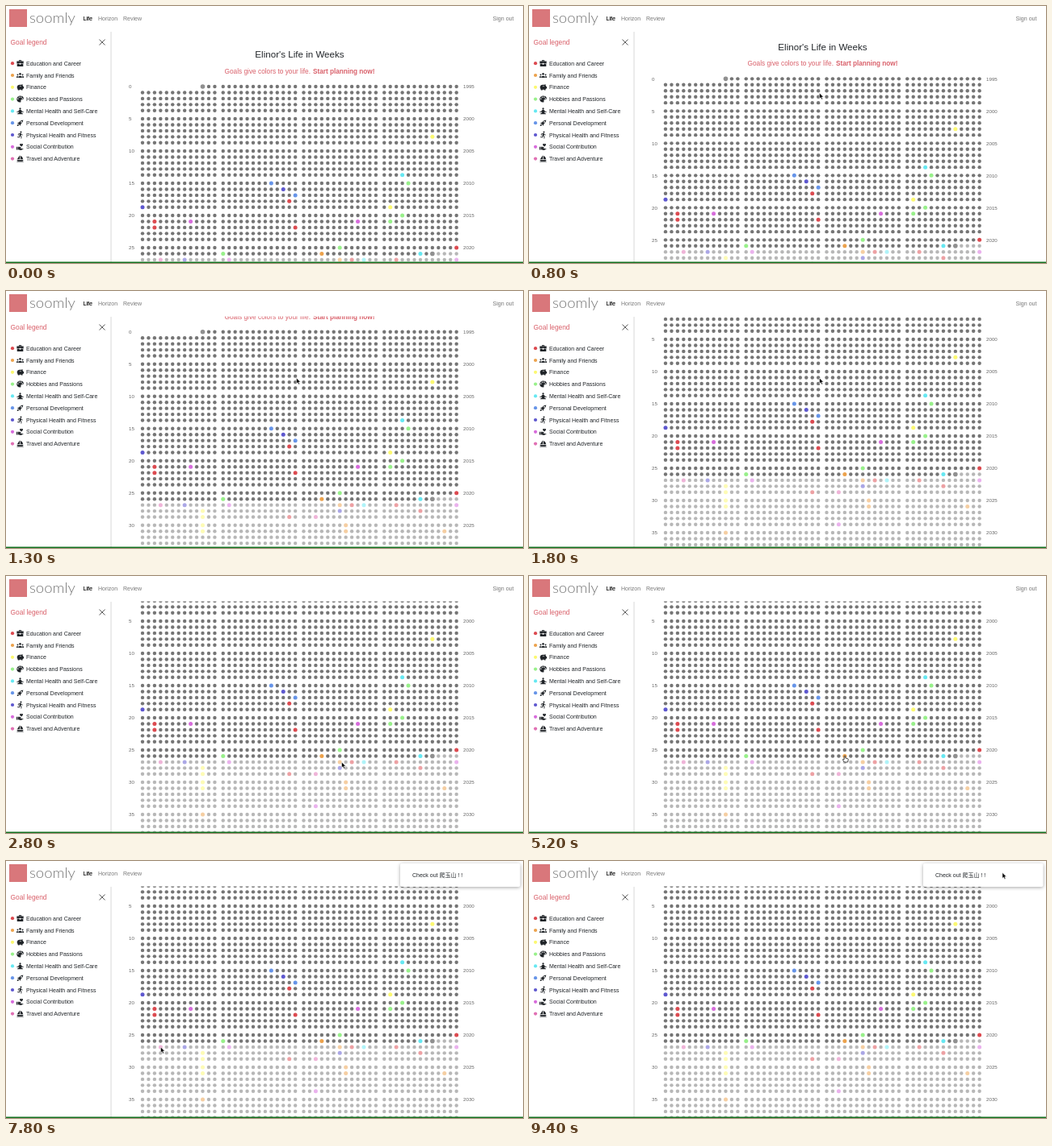
An HTML page for the animation above (9500 ms loop, 640 by 319 pixels).

```html
<!DOCTYPE html>
<html lang="en">
<head>
<meta charset="utf-8">
<title>Life in weeks</title>
<style>
  html, body { margin: 0; width: 100%; height: 100%; overflow: hidden; background: #fff; }
  svg { display: block; width: 100vw; height: 100vh; }
  text { font-family: "Liberation Sans", "Noto Sans CJK TC", "Noto Sans CJK", sans-serif; white-space: pre; }
  #toast rect { filter: drop-shadow(0 1px 2px rgba(0, 0, 0, .35)); }
</style>
</head>
<body>
<svg id="stage" viewBox="0 0 640 319">
  <g id="page"></g>
  <rect width="640" height="31.5" fill="#fff"/>
  <g id="chrome"></g>
  <g id="toast"><rect x="488" y="3" width="148.5" height="29" rx="2" fill="#fff"/></g>
  <g id="cursor" stroke-linejoin="round">
    <path id="arrow" d="M0 0V6.9L1.6 5.5L2.7 8L4 7.4L2.9 5H5Z" fill="#000" stroke="#fff" stroke-width=".5"/>
    <path id="hand" d="M-.8 4.6V.6Q0-.6.8.6V3L3.6 3.7Q4.4 4 4.2 5L3.6 8H-.6L-2.7 5Q-2.6 3.8-.8 4.6Z" fill="#fff" stroke="#000" stroke-width=".7"/>
  </g>
</svg>
<script>
const LOOP = 9500, STEP = 100;
const RED = '#d9606a', DARK = '#212529';
const $ = id => document.getElementById(id);

function add(parent, tag, attrs, content = '') {
  const node = document.createElementNS('http://www.w3.org/2000/svg', tag);
  for (const key in attrs) node.setAttribute(key, attrs[key]);
  node.textContent = content;
  return parent.appendChild(node);
}

// Places text by its left edge and the middle of its capitals.
const label = (parent, content, x, y, size, fill, extra = {}) =>
  add(parent, 'text', { x, y: y + size * .36, 'font-size': size, fill, ...extra }, content);

const page = $('page'), chrome = $('chrome'), toast = $('toast');

// Goal categories: name, colour, icon in a 12-unit box, weeks as "column,row".
const goals = [
  ['Education and Career', '#dc4a50',
    'M-2-3.5V-5.5H2V-3.5H5.5V.3H1V-.7H-1V.3H-5.5V-3.5ZM-1-3.5H1V-4.5H-1ZM-5 1.2H-1V2H1V1.2H5V5H-5Z',
    '24,18 2,21 2,22 25,22 51,25 34,27 41,27 45,28 24,29'],
  ['Family and Friends', '#eca24c',
    'M0-4a1.8 1.8 0 1 1-.01 0ZM-4-2a1.2 1.2 0 1 1-.01 0ZM4-2a1.2 1.2 0 1 1-.01 0ZM-3 4V2.4Q0-.2 3 2.4V4ZM-6 4V2.4Q-5 .9-3.6 1.5V4ZM6 4V2.4Q5 .9 3.6 1.5V4Z',
    '29,26 32,27 33,30 33,31 49,31 10,35'],
  ['Finance', '#fbf871',
    'M-5-1Q-4-4-1-4H2L4-5V-3L5-1H6V2L4 3V5H1.5V4H-1V5H-3.5Q-4 3-5 1ZM-1-2.5H2V-1.7H-1Z',
    '47,8 40,19 10,28 10,29 10,30 10,31'],
  ['Hobbies and Passions', '#98f08a',
    'M0-5.5C7-5.5 7 1 3 1C0 1 2 3 1 5C-8 6-7-5.5 0-5.5ZM-3.5-1.5a.9.9 0 1 0 .01 0ZM-1.5-4a.9.9 0 1 0 .01 0ZM1.5-4a.9.9 0 1 0 .01 0ZM3.6-1.7a.9.9 0 1 0 .01 0Z',
    '43,15 42,20 40,21 32,25 13,26'],
  ['Mental Health and Self-Care', '#66e8f2',
    'M0-5.3a1.5 1.5 0 1 1-.01 0ZM-1.5-1.8H1.5L3 .2L5.5 1V2L2.5 1.3L2 2.6L4.5 4V5H-4.5V4L-2 2.6L-2.5 1.3L-5.5 2V1L-3 .2Z',
    '42,14 45,26 36,27'],
  ['Personal Development', '#6694e8',
    'M5-5Q1-5-2-1L-5 0L-3 1L-1 3L0 5L1 2Q5-1 5-5ZM2-3a1.1 1.1 0 1 1-.01 0ZM-3 2Q-5 2-5 5Q-2 5-2 3Z',
    '21,15 25,17'],
  ['Physical Health and Fitness', '#5d57cf',
    'M1.3-5.8a1.2 1.2 0 1 1-.01 0ZM-3.5-1.8L0-3L1.2-2.7L2.4-1L4.3-.4V.7L1.6-.2L1.2 1.4L2.4 2.6V6H1.3V3.2L-.3 1.8L-1 4.6L-4.7 4L-4.5 3L-1.8 3.4L-.8-1.6L-2.5-1V1H-3.5Z',
    '23,16 0,19 7,27 32,28'],
  ['Social Contribution', '#d76cdc',
    'M2-.3L-.5-2.8Q-1-5 .8-5.3L2-4.4L3.2-5.3Q5-5 4.5-2.8ZM-6 0H-4V5H-6ZM-3.3 0H-1L2 1.2V2.2H0V2.8H2.5L5-.2+0L5.8 3.2L1.5 5.6L-3.3 4.5Z'.replace('5-.2+0L', ''),
    '8,21 35,21 14,27 51,27 28,34'],
  ['Travel and Adventure', '#e070b4',
    'M-.7-5.5V1H-5ZM.3-5.5Q4.5-3 4.8 1H.3ZM-5.5 2H5.5L4 4.3H-4ZM-5.5 5H5.5V5.8H-5.5Z',
    '3,27 28,29'],
];

// Life grid: 52 weeks across in quarters, years down in groups of five.
const FIRST_COL = 10, NOW_COL = 47, NOW_ROW = 26;
const weekX = col => 169 + (col % 13) * 7.45 + Math.floor(col / 13) * 99.75;
const yearY = row => 100 + (row % 5) * 7.45 + Math.floor(row / 5) * 40;
const goalColor = {};
for (const [, color, , weeks] of goals)
  for (const week of weeks.split(' ')) goalColor[week] = color;

for (let row = 0; row < 42; row++) {
  for (let col = row ? 0 : FIRST_COL; col < 52; col++) {
    const color = goalColor[col + ',' + row];
    const milestone = (row === 0 && col === FIRST_COL) || (row === NOW_ROW && col === NOW_COL);
    const future = row > NOW_ROW || (row === NOW_ROW && col > NOW_COL);
    add(page, 'circle', {
      cx: weekX(col), cy: yearY(row), r: milestone ? 2.8 : color ? 2.5 : 2.2,
      fill: color || (milestone ? '#909090' : '#757575'), opacity: future ? .52 : 1,
    });
  }
  if (row % 5 === 0) {
    label(page, row, 152, yearY(row), 6.2, '#666');
    label(page, 1995 + row, 566, yearY(row), 6.2, '#666');
  }
}
label(page, "Elinor's Life in Weeks", 363.5, 60.3, 11.6, DARK, { 'text-anchor': 'middle' });
label(page, 'Goals give colors to your life.', 270.5, 81, 8.3, RED);
label(page, 'Start planning now!', 380, 81, 8.2, RED, { 'font-weight': 'bold' });

// Header, legend and frame
add(chrome, 'rect', { x: 4, y: 4, width: 22, height: 22, fill: '#d9777b' });
label(chrome, 'soomly', 29, 14, 18.5, '#777', { style: 'font-family: Lato, sans-serif; font-weight: 300' });
label(chrome, 'Life', 95.5, 15.5, 7, '#000', { stroke: '#000', 'stroke-width': .15 });
label(chrome, 'Horizon', 114, 15.5, 7, '#777');
label(chrome, 'Review', 145, 15.5, 7, '#777');
label(chrome, 'Sign out', 602.5, 15.5, 7.1, '#777');
label(chrome, 'Goal legend', 5.5, 45.3, 8.35, RED);
add(chrome, 'path', { d: 'M115.5 41.5l7 7m0-7l-7 7', stroke: '#333', 'stroke-width': .8 });
add(chrome, 'path', { d: 'M130 32V318', stroke: '#d8d8d8', 'stroke-width': 1 });
add(chrome, 'rect', { y: 317.5, width: 640, height: 1.5, fill: '#12701f' });
goals.forEach(([name, color, icon], i) => {
  const y = 71.2 + i * 14.8;
  add(chrome, 'circle', { cx: 8, cy: y, r: 2.1, fill: color });
  add(chrome, 'path', { d: icon, fill: DARK, 'fill-rule': 'evenodd', transform: `translate(17.5 ${y}) scale(.76)` });
  label(chrome, name, 25, y, 7, DARK);
});

const toastText = label(toast, '', 503, 17.3, 7, DARK);

// Keyframes are [time, ...values], linear between neighbours.
const scrollKeys = [[700, 0], [1000, 29], [1400, 56], [1500, 56], [1800, 80], [2100, 84]];
const cursorKeys = [
  [0, 400, 330], [100, 396, 312], [600, 359.5, 108], [2500, 359.5, 108], [2800, 415.5, 231],
  [2900, 415.5, 231], [3500, 414, 236], [4300, 400, 232], [4900, 391, 223], [5800, 391, 223],
  [6500, 191.5, 231], [7800, 191.5, 231], [8700, 586, 14.5],
];
const toastKeys = [[5400, 0], [5600, 1], [7200, 1], [7300, 0], [7400, 0], [7600, 1]];

function at(keys, t) {
  const next = keys.findIndex(key => key[0] > t);
  if (next === 0) return keys[0].slice(1);
  if (next < 0) return keys[keys.length - 1].slice(1);
  const a = keys[next - 1], b = keys[next];
  const mix = (t - a[0]) / (b[0] - a[0]);
  return a.slice(1).map((v, i) => v + (b[i + 1] - v) * mix);
}

const within = (t, from, to) => t >= from && t < to;

function draw() {
  const t = Math.floor(performance.now() % LOOP / STEP) * STEP;
  page.setAttribute('transform', `translate(0 ${-at(scrollKeys, t)[0]})`);
  $('cursor').setAttribute('transform', `translate(${at(cursorKeys, t)})`);
  const pointing = within(t, 4900, 5900) || within(t, 6800, 7800);
  $('hand').style.display = pointing ? '' : 'none';
  $('arrow').style.display = pointing ? 'none' : '';
  toast.style.opacity = at(toastKeys, t)[0];
  toastText.textContent = t < 7300 ? 'Check out 帶全家人去旅行!' : 'Check out 爬玉山 ! !';
  requestAnimationFrame(draw);
}
draw();
</script>
</body>
</html>
```
